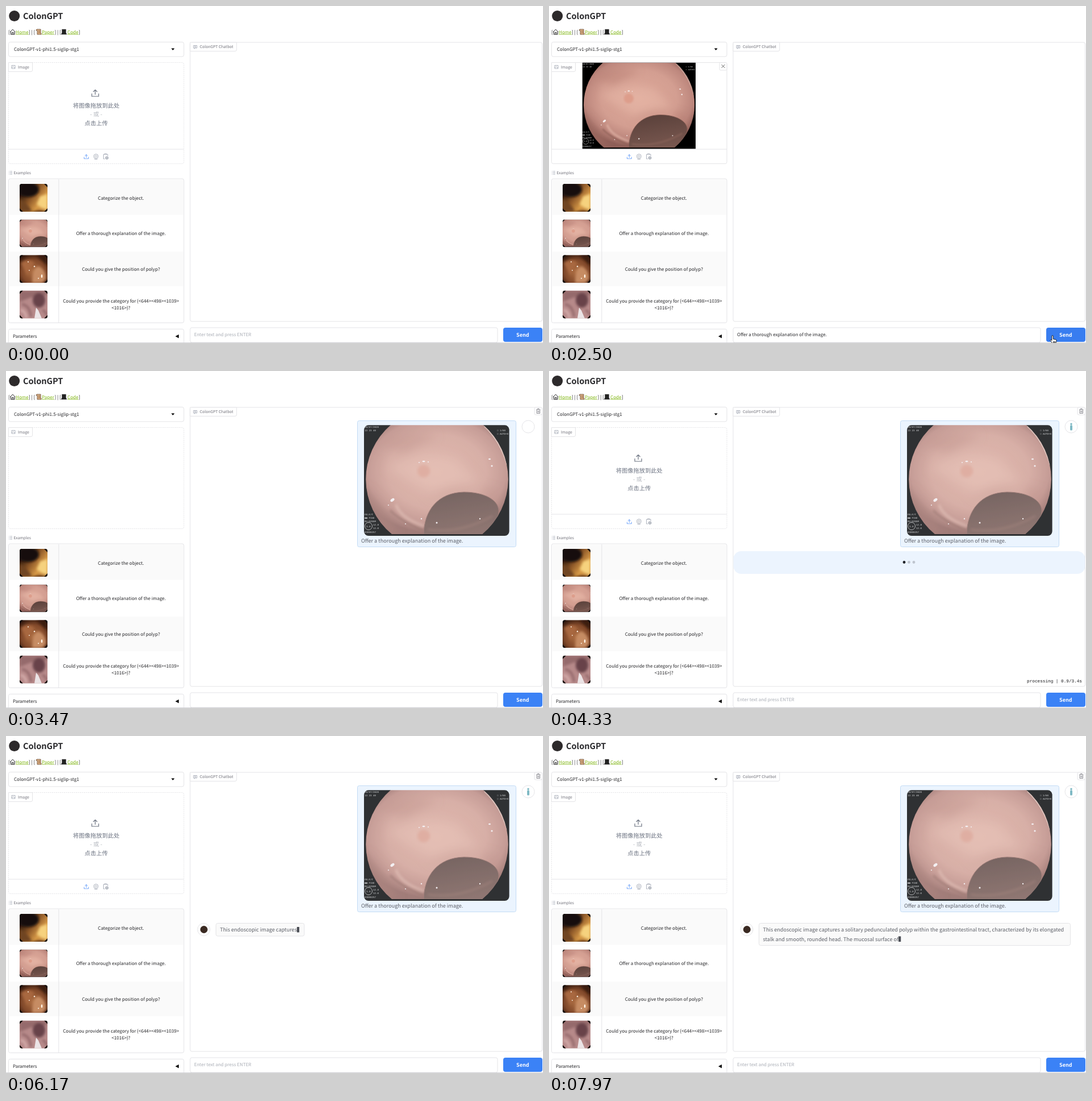
Write an HTML page that moves like this. It is 945 px wide and 593 px high and loops after 8000 ms.

```html
<!DOCTYPE html>
<html lang="en">
<head>
<meta charset="utf-8">
<title>ColonGPT</title>
<style>
html, body { margin: 0; width: 100%; height: 100%; overflow: hidden; background: #fff; }
svg { display: block; }
text { font: 8px "Noto Sans CJK SC", "Noto Sans CJK JP", "Noto Sans", sans-serif; fill: #27272a; text-rendering: geometricPrecision; white-space: pre; }
.box { fill: #fff; stroke: #e4e4e7; }
.line { fill: none; stroke: #e4e4e7; }
.icon { fill: none; stroke: #9ca3af; stroke-width: .8; }
.small { font-size: 6.85px; fill: #71717a; }
.mid { text-anchor: middle; }
.link text { font-size: 8.1px; }
.link .a { fill: #84b81a; text-decoration: underline; }
.drop text { font-size: 10.25px; fill: #6b7280; }
.chat { font-size: 9.1px; fill: #5b5e66; }
.mono { font: 7.7px "Liberation Mono", "DejaVu Sans Mono", monospace; fill: #18181b; text-anchor: end; }
.osd text { font: 4.2px "Liberation Mono", monospace; fill: #ddd; }
.soft { filter: url(#soft); }
</style>
</head>
<body>
<svg width="945" height="593" viewBox="0 0 945 593">
  <defs>
    <radialGradient id="flesh" cx=".5" cy=".42" r=".56">
      <stop offset="0" stop-color="#dfab9c"/><stop offset=".6" stop-color="#d39e91"/><stop offset=".85" stop-color="#bd877d"/><stop offset="1" stop-color="#8f5f58"/>
    </radialGradient>
    <linearGradient id="lumen" x1=".2" y1="0" x2=".5" y2="1">
      <stop offset="0" stop-color="#59403a"/><stop offset="1" stop-color="#78574f"/>
    </linearGradient>
    <linearGradient id="gold" x1="0" y1="0" x2="1" y2=".75">
      <stop offset=".2" stop-color="#2a170d"/><stop offset=".5" stop-color="#8a5527"/><stop offset=".8" stop-color="#d79a48"/><stop offset="1" stop-color="#c98a3e"/>
    </linearGradient>
    <radialGradient id="amber" cx=".5" cy=".6" r=".7">
      <stop offset="0" stop-color="#b07145"/><stop offset=".6" stop-color="#82492a"/><stop offset="1" stop-color="#2b140b"/>
    </radialGradient>
    <filter id="soft"><feGaussianBlur stdDeviation="2"/></filter>
    <filter id="haze"><feGaussianBlur stdDeviation="9"/></filter>
    <clipPath id="tiles">
      <rect x="24" y="313" width="49" height="49" rx="4"/><rect x="24" y="375.6" width="49" height="49" rx="4"/>
      <rect x="24" y="438.2" width="49" height="49" rx="4"/><rect x="24" y="500.8" width="49" height="49" rx="4"/>
    </clipPath>
    <clipPath id="round"><rect x="630" y="95.3" width="255.6" height="194.7" rx="8"/></clipPath>
    <clipPath id="disc"><path d="M47 0H210A125.4 125.4 0 0 1 208 192H49A125.4 125.4 0 0 1 47 0Z"/></clipPath>

    <symbol id="scope" viewBox="0 0 256 195">
      <rect width="256" height="195"/>
      <g clip-path="url(#disc)">
        <rect width="256" height="195" fill="url(#flesh)"/>
        <g filter="url(#haze)">
          <path d="M20 30Q70 5 130 18L70 50Z" fill="#b98277" opacity=".5"/>
          <path d="M40 75Q100 40 165 62L200 100L120 120Z" fill="#e8b8a8" opacity=".5"/>
          <path d="M0 110Q40 140 60 195H0Z" fill="#a06d64" opacity=".6"/>
          <path d="M110 130Q160 92 240 120L245 160L200 110Z" fill="#b78074" opacity=".5"/>
        </g>
        <path d="M212 2Q240 28 252 70" fill="none" stroke="#f0d6ca" stroke-width="2.5" opacity=".7"/>
        <path d="M46 150Q62 168 108 188" fill="none" stroke="#8d5e55" stroke-width="3" class="soft"/>
        <path d="M56 140Q64 164 106 178" fill="none" stroke="#e3b8aa" stroke-width="5" opacity=".6" class="soft"/>
        <path d="M105 192C106 150 130 119 176 118C212 118 236 132 237 150C237 170 226 180 212 192Z" fill="url(#lumen)" stroke="#8e635a"/>
        <path d="M112 184Q170 192 226 160" fill="none" stroke="#8d665c" stroke-width="4" opacity=".6" class="soft"/>
        <circle cx="105" cy="81" r="11" fill="#dd9d8b" class="soft"/>
      </g>
      <g fill="#f5eeee">
        <ellipse cx="50" cy="132" rx="4" ry="2.3" transform="rotate(-35 50 132)"/>
        <ellipse cx="105" cy="64" rx="2.5" ry="1.3"/><circle cx="113" cy="65" r="1"/><circle cx="97" cy="66" r="1"/>
        <ellipse cx="221" cy="60" rx="2" ry="1.2"/><circle cx="225" cy="72" r="1.6"/><circle cx="43" cy="141" r="1"/>
        <circle cx="128" cy="172" r="1.5"/><circle cx="101" cy="165" r="1.2"/><circle cx="73" cy="174" r="1"/><circle cx="204" cy="165" r="1.2"/>
      </g>
      <g class="osd">
        <text x="1" y="5">20/07/2020</text><text x="1" y="11">13 23 40</text>
        <text x="234" y="11">□ 1/60</text><text x="234" y="17">□ AUTO+0</text>
        <text x="1" y="159">FR:F/T</text><text x="1" y="165">■■ FIXE</text><text x="1" y="171">RU:EZOOM</text>
        <circle cx="8" cy="178" r="6.5" fill="none" stroke="#ccc" stroke-width=".8"/>
        <text x="4" y="179.5">3.0</text><text x="16" y="177">12.8</text><text x="16" y="183">12.0</text><text x="1" y="190">03000257</text>
      </g>
    </symbol>
    <symbol id="upload" viewBox="0 0 14 14" fill="none" stroke="currentColor">
      <path d="M1 8V13H13V8M7 10V1.5M3.5 5L7 1.5L10.5 5" stroke-width="1.2"/>
    </symbol>
    <path id="corners" d="M0 0H6L0 6ZM49 0V6L43 0ZM0 49V43L6 49ZM49 49H43L49 43Z" fill="#120c0a"/>
  </defs>

  <!-- header -->
  <circle cx="14.7" cy="17.5" r="9.5" fill="#2d2a2b"/>
  <text x="30" y="23" style="font-size:14.5px;font-weight:700">ColonGPT</text>
  <g class="link">
    <text x="4" y="48.5">[</text><text class="a" x="17" y="48.5">Home</text><text x="40" y="48.5">] | [</text>
    <text class="a" x="63" y="48.5">Paper</text><text x="85.5" y="48.5">] | [</text><text class="a" x="108" y="48.5">Code</text><text x="128" y="48.5">]</text>
    <path d="M7 46L11.7 41L16.4 46M8.3 45V50H15.2V45M10.7 50V46.5H13V50" fill="#f4f4f4" stroke="#333"/>
    <path d="M54 41H61V48H62V50H55V43H53Z" fill="#e7b98c" stroke="#5a3a24" stroke-width=".8"/>
    <path d="M56.5 43.5H60M56.5 45.5H60M56.5 47.5H60" stroke="#5a3a24" stroke-width=".6"/>
    <path d="M98.5 41H105.5V47L107 50H97L98.5 47Z" fill="#222" stroke="#555" stroke-width=".5"/>
  </g>

  <!-- left column -->
  <rect class="box" x="4.5" y="63.5" width="308.5" height="25.5" rx="3"/>
  <text x="14" y="79">ColonGPT-v1-phi1.5-siglip-stg1</text>
  <path d="M290.8 74.5H296.6L293.7 78Z"/>

  <rect id="frame" class="box" x="4.5" y="99.5" width="308.5" height="178" rx="3"/>
  <g id="drop" class="drop">
    <use href="#upload" x="150" y="146" width="14" height="14" color="#6b7280"/>
    <text class="mid" x="158.7" y="179">将图像拖放到此处</text>
    <text class="mid" x="158.7" y="194" style="fill:#b4b8bf">- 或 -</text>
    <text class="mid" x="158.7" y="210">点击上传</text>
  </g>
  <g id="tools">
    <path class="line" d="M4.5 252H313"/>
    <use href="#upload" x="136.5" y="260.5" width="9.5" height="9" color="#3b82f6"/>
    <g class="icon">
      <circle cx="158.3" cy="264.5" r="4"/><circle cx="158.3" cy="264.5" r="1.8"/><path d="M155.5 269.5H161"/>
      <path d="M174 269H171.5V261H179V264M173.5 261.5V260H177V261.5"/><rect x="175" y="265" width="5" height="4.5" rx="2" fill="#c4c8ce"/>
    </g>
  </g>
  <g id="preview">
    <use href="#scope" x="58.5" y="99.5" width="199.5" height="152"/>
    <rect class="box" x="300" y="99.5" width="13" height="13.5" rx="2"/>
    <path d="M303.5 103L309.5 109M309.5 103L303.5 109" stroke="#555" stroke-width=".9"/>
  </g>
  <path class="box" d="M4.5 99.5H46.5V113Q46.5 115.5 44 115.5H4.5Z"/>
  <path class="icon" d="M10 104.5H16V110H10ZM10 109L12.5 106.5L16 109.5"/>
  <text class="small" x="21" y="109.7">Image</text>

  <path class="icon" d="M5 291H6M7 291H11M5 293.5H6M7 293.5H11M5 296H6M7 296H11"/>
  <text class="small" x="13.5" y="296.2">Examples</text>
  <rect class="box" x="4.5" y="304" width="308.5" height="253.5" rx="3"/>
  <path d="M6 305.5H312V367.5H6ZM6 432H312V493H6Z" fill="#fafafa"/>
  <path class="line" d="M92.8 305V557"/>
  <g id="hover">
    <rect x="6" y="370" width="306" height="60.5" fill="#ebf4fe"/>
    <path d="M92.8 370V430.5" stroke="#b3d6ef"/>
  </g>
  <g clip-path="url(#tiles)">
    <g transform="translate(24 313)">
      <rect width="49" height="49" fill="url(#gold)"/>
      <g class="soft">
        <ellipse cx="15" cy="10" rx="19" ry="13" fill="#120a08"/>
        <path d="M36 22L49 18V46L38 42L30 36Z" fill="#f6d27e"/>
        <path d="M0 26Q14 34 22 49H0Z" fill="#6f4420"/>
        <path d="M22 49Q36 44 49 49V52H22Z" fill="#5a3316"/>
      </g>
      <use href="#corners"/>
    </g>
    <svg x="24" y="375.6" width="49" height="49" viewBox="30 0 195 195"><use href="#scope" width="256" height="195"/></svg>
    <g transform="translate(24 438.2)">
      <rect width="49" height="49" fill="url(#amber)"/>
      <g class="soft">
        <path d="M22 49Q22 20 34 20Q46 26 46 42L40 49Z" fill="#c68c64"/>
        <path d="M2 14Q16 4 26 14L14 36Z" fill="#a8683f"/>
        <path d="M30 0H49V18Z" fill="#3a1b0f"/>
      </g>
      <g fill="#fff4e6"><circle cx="15" cy="12" r="1"/><circle cx="26" cy="20" r="1.2"/><circle cx="17" cy="27" r=".9"/><ellipse cx="39" cy="37" rx="1.3" ry="3"/><circle cx="33" cy="41" r="1"/></g>
      <use href="#corners"/>
    </g>
    <g transform="translate(24 500.8)">
      <rect width="49" height="49" fill="#b78a8a"/>
      <g class="soft">
        <path d="M0 0H49V8L20 12L0 20Z" fill="#956a6c"/>
        <ellipse cx="34" cy="17" rx="11" ry="13" fill="#68434a"/>
        <path d="M4 24Q18 26 20 46M40 34Q46 36 48 44" fill="none" stroke="#8b6063" stroke-width="3"/>
        <path d="M2 34Q10 36 12 48" fill="none" stroke="#d6aeac" stroke-width="4"/>
      </g>
      <path d="M26 49L29 30L33 35L39 49Z" fill="#ebe4e6"/>
      <use href="#corners"/>
    </g>
  </g>
  <g class="mid">
    <text x="202.3" y="340.6">Categorize the object.</text>
    <text x="202.3" y="403.2">Offer a thorough explanation of the image.</text>
    <text x="202.3" y="465.8">Could you give the position of polyp?</text>
    <text x="202.3" y="522">Could you provide the category for {&lt;644&gt;&lt;498&gt;&lt;1039&gt;</text>
    <text x="202.3" y="534">&lt;1016&gt;}?</text>
  </g>
  <rect class="box" x="4.5" y="568.5" width="308.5" height="30" rx="3"/>
  <text x="12" y="584">Parameters</text>
  <path d="M304 578V584.4L298 581.2Z"/>

  <!-- chat -->
  <rect class="box" x="324" y="64" width="619.5" height="491" rx="3"/>
  <path class="box" d="M324 64H405.8V77Q405.8 79.5 403 79.5H324Z"/>
  <path class="icon" d="M330 69.5H336V74H333L331.5 75.3V74H330ZM331.5 71H334.5M331.5 72.5H334.5"/>
  <text class="small" x="341" y="74.2">ColonGPT Chatbot</text>

  <g id="message">
    <rect class="box" x="930" y="64" width="13.5" height="13" rx="2"/>
    <path class="icon" d="M933 68H940.5M934 68.5V74.5H939.5V68.5M935.5 67.5V66.3H938V67.5M936 70V73M937.7 70V73" style="stroke:#71717a"/>
    <rect x="618.5" y="87.5" width="279" height="222" rx="3" fill="#ebf4fe" stroke="#c3dcf5"/>
    <g clip-path="url(#round)" opacity=".8"><use href="#scope" x="630" y="95" width="256" height="195"/></g>
    <text class="chat" x="625" y="302.3">Offer a thorough explanation of the image.</text>
    <circle class="box" cx="919" cy="98" r="11"/>
  </g>
  <g id="person" fill="#7fb9c4">
    <circle cx="919" cy="93.3" r="1.7"/><rect x="917" y="95.2" width="4" height="9.3" rx="1.5"/>
  </g>

  <g id="pending">
    <rect x="324.5" y="317" width="619" height="40" rx="14" fill="#ecf4fe"/>
    <g id="dots" fill="#1f2128"><circle cx="625" cy="336.5" r="2.4"/><circle cx="633.5" cy="336.5" r="2.4"/><circle cx="642" cy="336.5" r="2.4"/></g>
    <text id="timer" class="mono" x="938" y="548.3"></text>
  </g>

  <g id="reply">
    <circle class="box" cx="348" cy="340.5" r="11"/>
    <circle cx="348.3" cy="340.5" r="6.5" fill="#3a2a22"/>
    <rect id="bubble" x="369.5" y="329.5" rx="3" fill="#fafafa" stroke="#e4e4e7"/>
    <text id="row1" class="chat" x="376.5" y="344.4"></text>
    <text id="row2" class="chat" x="376.5" y="360.9"></text>
    <rect id="caret" width="4.2" height="9.5" fill="#4b4e55"/>
  </g>

  <rect class="box" x="324" y="566" width="541" height="26" rx="3"/>
  <text id="input" x="331" y="581.4"></text>
  <rect id="send" x="875" y="566" width="69" height="25" rx="4"/>
  <text class="mid" x="909.3" y="582.2" style="font-size:9px;font-weight:700;fill:#fff">Send</text>
  <path d="M0 592.5H945" stroke="#d4d4d8"/>

  <g id="cursor" stroke-linejoin="round">
    <path id="arrow" d="M0 0V11L2.6 8.6L4.5 12.5L6 11.8L4.2 8H7.5Z" stroke="#fff" stroke-width=".8"/>
    <path id="hand" d="M-1.2 1a1.2 1.2 0 0 1 2.4 0V6l4.5 1a1.8 1.8 0 0 1 1.3 2L6 13V15H-.5V13L-4 8.5q0-1.6 1.5-1l1.3 1.2ZM3 10V13M4.5 10V13M1.5 10V13" fill="#fff" stroke="#111" stroke-width=".9"/>
  </g>
</svg>
<script>
const LOOP = 8000;
const $ = id => document.getElementById(id);
const show = (id, on) => $(id).style.display = on ? '' : 'none';
const set = (id, attrs) => { for (const k in attrs) $(id).setAttribute(k, attrs[k]); };

const PROMPT = 'Offer a thorough explanation of the image.';
const WORDS = ('This endoscopic image captures a solitary pedunculated polyp within the gastrointestinal tract, ' +
  'characterized by its elongated stalk and smooth, rounded head. The mucosal surface of').split(' ');
const spread = (n, from, to) => Array.from({ length: n }, (_, i) => from + (to - from) * i / (n - 1));
const WORD_TIMES = [5900, 6070, 6130, 6170, 6230, 6330, ...spread(12, 6500, 7300), 7400, 7500, ...spread(5, 7670, 7970)];
const ROW_WORDS = 16;

const PICK = 1700, SUBMIT = 2900, WAIT = 3560, ANSWER = 5070;

// time, x, y of the pointer tip
const PATH = [[300, 890, 252], [330, 846, 241], [570, 846, 241], [1130, 247, 394], [1630, 247, 394],
  [2400, 848, 579], [2500, 886, 580], [2730, 905, 574], [2870, 905, 574], [3200, 937, 600]];

function pointer(t) {
  const i = PATH.findIndex(p => p[0] > t);
  if (i < 1) return null;
  const [t0, x0, y0] = PATH[i - 1], [t1, x1, y1] = PATH[i];
  const u = (t - t0) / (t1 - t0);
  const e = t1 - t0 > 500 ? u * u * (3 - 2 * u) : u;
  return [x0 + (x1 - x0) * e, y0 + (y1 - y0) * e];
}

function drawPointer(t) {
  const p = pointer(t);
  show('cursor', p);
  const [x, y] = p || [0, 0];
  const onRow = x > 6 && x < 312 && y > 370 && y < 431;
  const onSend = x > 875 && y > 565;
  if (p) set('cursor', { transform: `translate(${x} ${y})` });
  show('hand', onRow || onSend);
  show('arrow', !onRow && !onSend);
  show('hover', onRow);
  set('send', { fill: onSend ? '#387df0' : '#3b82f6' });
}

function drawPending(t) {
  show('pending', t >= WAIT && t < ANSWER);
  [...$('dots').children].forEach((dot, i) => {
    const p = (((t - 4330 - i * 500) / 1000) % 2 + 4) % 2;
    const dark = Math.max(0, 1 - 2 * Math.min(p, 2 - p));
    dot.setAttribute('opacity', .22 + .78 * dark);
  });
  $('timer').textContent = `processing | ${(Math.floor((t - 3400) / 100) / 10).toFixed(1)}/3.4s`;
}

function drawReply(t) {
  show('reply', t >= ANSWER);
  if (t < ANSWER) return;
  const n = WORD_TIMES.filter(w => w <= t).length;
  // the caret pushes the last word of a full row to the next one
  const cut = n === ROW_WORDS ? n - 1 : ROW_WORDS;
  const two = n > cut;
  $('row1').textContent = WORDS.slice(0, Math.min(n, cut)).join(' ');
  $('row2').textContent = two ? WORDS.slice(cut, n).join(' ') : '';
  const end = n ? $(two ? 'row2' : 'row1').getComputedTextLength() : 0;
  set('caret', { x: 376.5 + end, y: two ? 352.5 : 336 });
  set('bubble', { width: two ? 548 : end + 20, height: two ? 39 : 22.5 });
}

function draw(t) {
  const picked = t >= PICK && t < SUBMIT;
  const busy = t >= SUBMIT && t < WAIT;
  show('preview', picked);
  show('drop', !picked && !busy);
  show('tools', !busy);
  set('frame', { 'stroke-dasharray': picked ? 'none' : '2 1.5' });
  show('message', t >= SUBMIT);
  show('person', t >= WAIT);
  $('input').textContent = picked ? PROMPT : busy ? '' : 'Enter text and press ENTER';
  $('input').style.fill = picked ? '#27272a' : '#a9adb5';
  drawPending(t);
  drawReply(t);
  drawPointer(t);
}

const start = performance.now();
function tick() {
  draw((performance.now() - start) % LOOP);
  requestAnimationFrame(tick);
}
tick();
</script>
</body>
</html>
```
